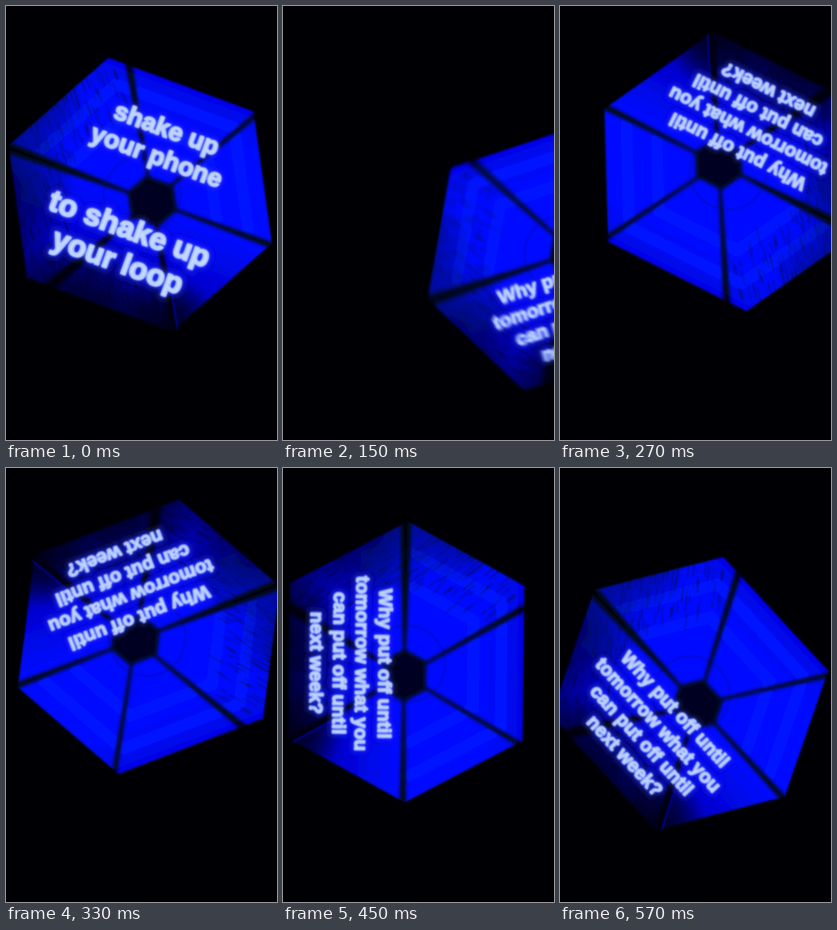
Write an HTML page with a canvas that moves like this. It is 400x640 px and loops after 600 ms.

```html
<!DOCTYPE html>
<html lang="en">
<head>
<meta charset="utf-8">
<title>Shake</title>
<style>
  html, body { margin: 0; width: 100%; height: 100%; overflow: hidden; background: #000004; }
  canvas { display: block; width: 400px; height: 640px; }
</style>
</head>
<body>
<canvas id="stage" width="400" height="640"></canvas>
<script>
const LOOP = 600, STEP = 30, SIZE = 540, MID = SIZE / 2, RAD = Math.PI / 180;
const ctx = document.getElementById('stage').getContext('2d');

const ASK = [
  ['shake up', -103, 37.5], ['your phone', -60, 37.5],
  ['to shake up', 54, 45], ['your loop', 106, 44.5]
];
const ANSWER = ['Why put off until', 'tomorrow what you', 'can put off until', 'next week?']
  .map((text, i) => [text, 33 + 33.5 * i, 28]);

// Where the incoming die is: time, x, y
const PATH = [
  [30, 640, 740], [90, 497, 499], [210, 338, 269], [270, 248, 243],
  [330, 208, 250], [450, 182, 289], [600, 197, 346]
];

const polar = (r, deg) => [r * Math.cos(deg * RAD), r * Math.sin(deg * RAD)];

// Hexagon with its top and bottom edges a little wider than the others
function hexagon(r, cx = 0, cy = 0) {
  return Array.from({ length: 6 }, (_, k) => {
    const [x, y] = polar(r, 60 * k - 4 * Math.sin(120 * k * RAD));
    return [cx + x, cy + y];
  });
}

function layer() {
  const c = document.createElement('canvas');
  c.width = c.height = SIZE;
  const g = c.getContext('2d');
  g.translate(MID, MID);
  return g;
}

function randomizer(seed) {
  return () => (seed = (seed * 16807) % 2147483647) / 2147483647;
}

function trace(g, points) {
  g.beginPath();
  points.forEach(([x, y]) => g.lineTo(x, y));
}

function fillShape(g, points, color) {
  trace(g, points);
  g.fillStyle = color;
  g.fill();
}

function line(g, points, color, width) {
  trace(g, points);
  g.strokeStyle = color;
  g.lineWidth = width;
  g.stroke();
}

function shade(g, x, y, r, alpha) {
  const fade = g.createRadialGradient(x, y, 0, x, y, r);
  fade.addColorStop(0, `rgba(0,0,4,${alpha})`);
  fade.addColorStop(0.5, `rgba(0,0,4,${alpha * 0.65})`);
  fade.addColorStop(1, 'rgba(0,0,4,0)');
  g.fillStyle = fade;
  g.fillRect(x - r, y - r, 2 * r, 2 * r);
}

// Drawn with the text horizontal and the origin in the middle
function drawBody() {
  const g = layer(), rand = randomizer(71);
  const fill = g.createLinearGradient(0, -172, 0, 172);
  fill.addColorStop(0, '#0000d8');
  fill.addColorStop(0.15, '#0004ee');
  fill.addColorStop(0.55, '#0002ee');
  fill.addColorStop(0.8, '#0000c0');
  fill.addColorStop(1, '#000060');
  fillShape(g, hexagon(207, -3, 0), fill);
  g.globalCompositeOperation = 'source-atop';

  // Paler bands that follow the rim
  g.filter = 'blur(2px)';
  for (const r of [118, 168]) {
    const ring = hexagon(r);
    line(g, [...ring.slice(3), ring[0]], 'rgba(0,20,255,0.75)', 17);
  }
  g.filter = 'none';

  // Worn rim: shadows and brushed streaks
  shade(g, -205, 70, 120, 0.65);
  shade(g, -200, -70, 80, 0.4);
  shade(g, -25, 190, 115, 0.65);
  shade(g, 100, 165, 75, 0.85);
  for (let i = 0; i < 320; i++) {
    const [x, y] = polar(215 - 95 * rand() ** 1.3, 60 + 180 * rand());
    const [dx, dy] = polar(6 + 22 * rand(), 50);
    line(g, [[x, y], [x + dx, y + dy]], `rgba(0,0,10,${0.2 + 0.45 * rand()})`, 1.3);
  }

  g.beginPath();
  g.arc(0, 0, 57, 0, 2 * Math.PI);
  g.strokeStyle = 'rgba(0,0,100,0.7)';
  g.lineWidth = 1;
  g.stroke();

  // Six tapered gaps around an off-centre hub
  g.save();
  g.filter = 'blur(2px)';
  g.translate(17, 3);
  for (let k = 0; k < 6; k++) {
    const end = 7 + 3 * Math.cos(60 * (k - 2) * RAD);
    g.save();
    g.rotate(60 * k * RAD);
    fillShape(g, [[30, -2], [240, -end], [240, end], [30, 2]], '#000008');
    g.restore();
  }
  fillShape(g, hexagon(39), '#000018');
  g.restore();

  g.globalCompositeOperation = 'source-over';
  g.filter = 'blur(0.7px)';
  line(g, [[84, 108], [117, 166]], 'rgba(0,0,190,0.8)', 2.5);
  return g.canvas;
}

function makeDie(body, lines) {
  const g = layer();
  g.filter = 'blur(1.3px)';
  g.drawImage(body, -MID, -MID);
  g.textAlign = 'center';
  g.lineJoin = 'round';
  const write = (color, blur, weight) => {
    g.filter = `blur(${blur}px)`;
    g.fillStyle = g.strokeStyle = color;
    for (const [text, y, size] of lines) {
      g.font = `bold ${size}px "Liberation Sans", Arial, sans-serif`;
      g.lineWidth = size * weight;
      g.strokeText(text, 0, y + size * 0.3);
      g.fillText(text, 0, y + size * 0.3);
    }
  };
  write('rgba(35,60,255,0.8)', 3, 0.14);
  write('#bed2f2', 1.1, 0.06);
  return g.canvas;
}

// Smooth curve through the keys of PATH
function along(t) {
  const last = PATH.length - 1;
  let i = 0;
  while (i < last - 1 && t >= PATH[i + 1][0]) i++;
  const slope = (k, c) => {
    const a = PATH[Math.max(k - 1, 0)], b = PATH[Math.min(k + 1, last)];
    return (b[c] - a[c]) / (b[0] - a[0]);
  };
  const p = PATH[i], q = PATH[i + 1], span = q[0] - p[0], u = (t - p[0]) / span, v = 1 - u;
  return [1, 2].map(c =>
    p[c] * (1 + 2 * u) * v * v + slope(i, c) * span * u * v * v +
    q[c] * u * u * (3 - 2 * u) - slope(i + 1, c) * span * u * u * v);
}

// The answer tumbles in, and its spin dies away
const incoming = t => [...along(t), 464 * Math.exp((90 - t) / 264) - 28];

// The question is flung off to the upper left
function outgoing(t) {
  const p = (Math.max(t, 0) / 90) ** 2;
  return [201 - 275 * p, 279 - 328 * p, 20.3 + 104 * p];
}

const body = drawBody();
const askDie = makeDie(body, ASK), answerDie = makeDie(body, ANSWER);

// Several angles are averaged to blur the spin
function place(die, pose, t) {
  const [x, y] = pose(t), shutter = Math.max(0, 5 - t / 60), count = 10;
  ctx.globalAlpha = 1 / count;
  for (let i = 0; i < count; i++) {
    const angle = pose(t + shutter * ((i + 0.5) / count - 0.5))[2];
    ctx.save();
    ctx.translate(x, y);
    ctx.rotate(angle * RAD);
    ctx.drawImage(die, -MID, -MID);
    ctx.restore();
  }
}

function draw(t) {
  ctx.globalCompositeOperation = 'source-over';
  ctx.globalAlpha = 1;
  ctx.fillStyle = '#000004';
  ctx.fillRect(0, 0, 400, 640);
  ctx.globalCompositeOperation = 'lighter';
  if (t < 180) place(askDie, outgoing, t);
  if (t >= 30) place(answerDie, incoming, t);
}

const start = performance.now();
let shown = -1;
function tick() {
  const step = Math.floor((performance.now() - start) % LOOP / STEP);
  if (step !== shown) draw((shown = step) * STEP);
  requestAnimationFrame(tick);
}
tick();
</script>
</body>
</html>
```
